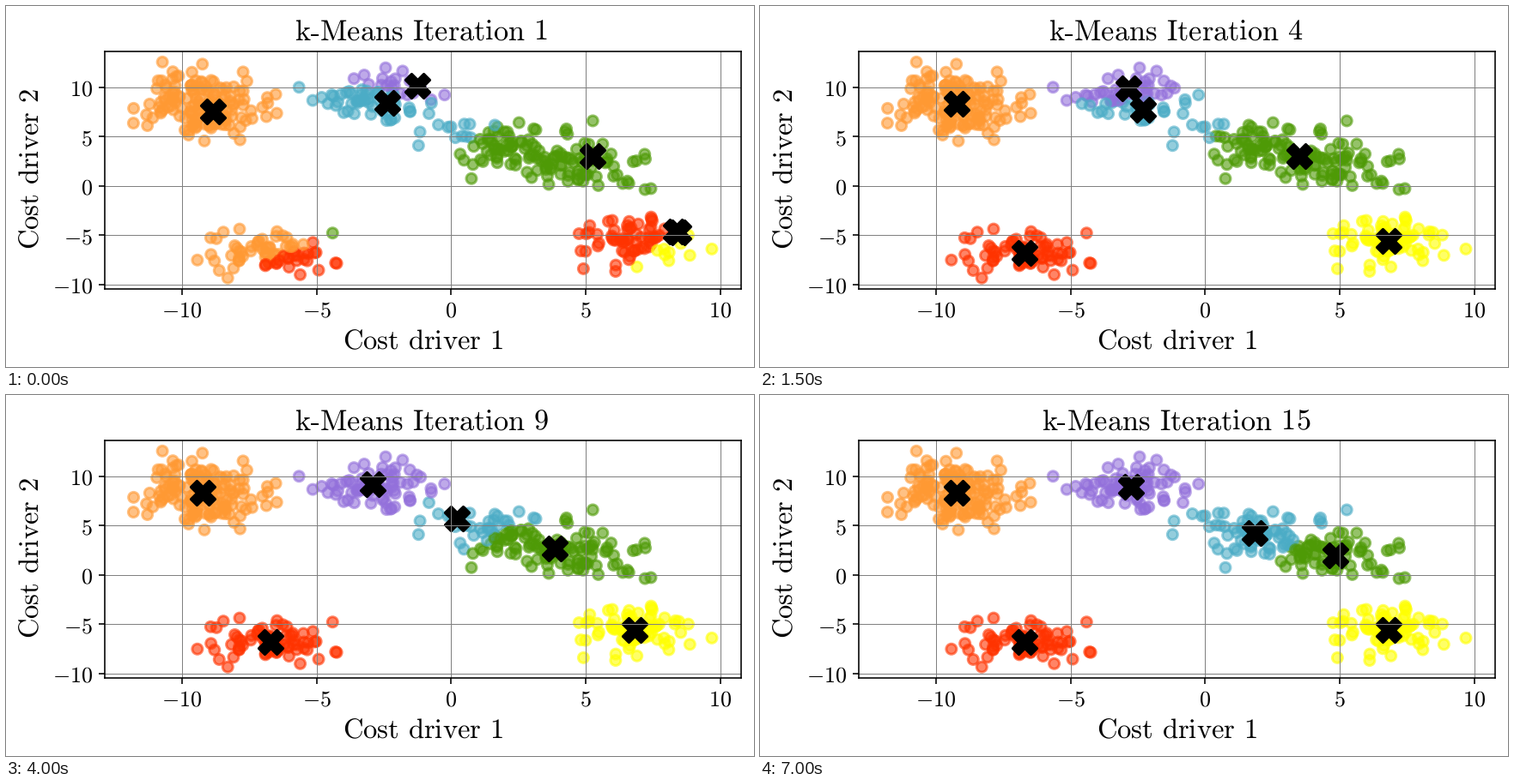
These frames come from a looping animation (871 by 421 pixels, 7500 ms). A matplotlib script:

```python
import numpy as np
import matplotlib.pyplot as plt
from matplotlib.animation import FuncAnimation
from matplotlib.patches import Rectangle

W, H, DPI = 871, 421, 128
STEPS, INTERVAL = 15, 500
COLORS = np.array(["#FF9933", "#4BACC6", "#9370DB", "#4E9A06", "#FF3300", "#FFFF00"])
SEEDS = [(-8.82, 7.54), (-2.36, 8.48), (-1.24, 10.2),
         (5.26, 3.05), (8.29, -4.64), (8.49, -4.74)]


def px(v):
    """Pixels to points."""
    return v * 72 / DPI


def make_blobs(total=500, blobs=7, std=1.2, seed=42):
    rng = np.random.RandomState(seed)
    centers = rng.uniform(-10, 10, (blobs, 2))
    sizes = [total // blobs + (i < total % blobs) for i in range(blobs)]
    pts = np.vstack([rng.normal(c, std, (n, 2)) for c, n in zip(centers, sizes)])
    order = np.arange(total)
    rng.shuffle(order)
    return pts[order]


def pick_starts(pts, seeds):
    """The data point closest to each seed, none taken twice."""
    taken = []
    for seed in seeds:
        near = ((pts - seed) ** 2).sum(axis=1).argsort()
        taken.append(next(i for i in near if i not in taken))
    return pts[taken]


def k_means(pts, means, steps):
    history = []
    for _ in range(steps):
        dist = ((pts[:, None] - means) ** 2).sum(axis=2)
        labels = dist.argmin(axis=1)
        history.append((means.copy(), labels))
        for k in range(len(means)):
            if (labels == k).any():
                means[k] = pts[labels == k].mean(axis=0)
    return history


def roman(text):
    """Upright math text with full word spaces."""
    words = [r"\mathrm{%s}" % w for w in text.split()]
    return "$" + r"\hspace{0.379}".join(words) + "$"


def label(x, y, text, size, **kw):
    return fig.text(x / W, 1 - y / H, text, fontsize=px(size), va="baseline",
                    rotation_mode="anchor", **kw)


plt.rcParams["mathtext.fontset"] = "cm"
plt.rcParams["text.hinting"] = "no_hinting"

points = make_blobs()
history = k_means(points, pick_starts(points, SEEDS), STEPS)

fig = plt.figure(figsize=(W / DPI, H / DPI), dpi=DPI, facecolor="white")
ax = fig.add_axes([114.7 / W, 91.25 / H, 740.9 / W, 277 / H])

dots = ax.scatter(*points.T, s=px(12) ** 2, linewidths=px(3), alpha=0.6,
                  c=COLORS[history[0][1]])
marks = ax.scatter(*history[0][0].T, s=px(28.28) ** 2, linewidths=px(3),
                   c="black", marker="X")

ticks = range(-10, 11, 5)
ax.set_xticks(ticks, [f"${t}$" for t in ticks])
ax.set_yticks(ticks, [f"${t}$" for t in ticks])
ax.tick_params(length=px(7), width=px(1.6), pad=px(7), labelsize=px(26))
ax.tick_params(axis="x", pad=px(6))
ax.grid(color="gray", linewidth=px(1))
for spine in ax.spines.values():
    spine.set_linewidth(px(1.6))

label(485, 400, roman("Cost driver 1"), 32.6, ha="center")
label(38, 190.5, roman("Cost driver 2"), 32.6, ha="center", rotation=90)

EM, BASE, MIDDLE = 34.3, 41, 484.5
title = label(0, BASE, "", EM, ha="left")
hyphen = Rectangle((0, 1 - (BASE - 0.187 * EM) / H), 0.265 * EM / W, 0.058 * EM / H,
                   facecolor="black", linewidth=0, transform=fig.transFigure)
fig.add_artist(hyphen)


def update(i):
    means, labels = history[i]
    dots.set_facecolor(COLORS[labels])
    dots.set_edgecolor(COLORS[labels])
    marks.set_offsets(means)

    number = str(i + 1)
    left = MIDDLE - (8.147 + 0.5 * len(number)) * EM / 2
    title.set_text(roman(f"k Means Iteration {number}"))
    title.set_x(left / W)
    hyphen.set_x((left + 0.539 * EM) / W)
    return dots, marks, title, hyphen


anim = FuncAnimation(fig, update, frames=STEPS, interval=INTERVAL, repeat=True)
plt.show()
```
